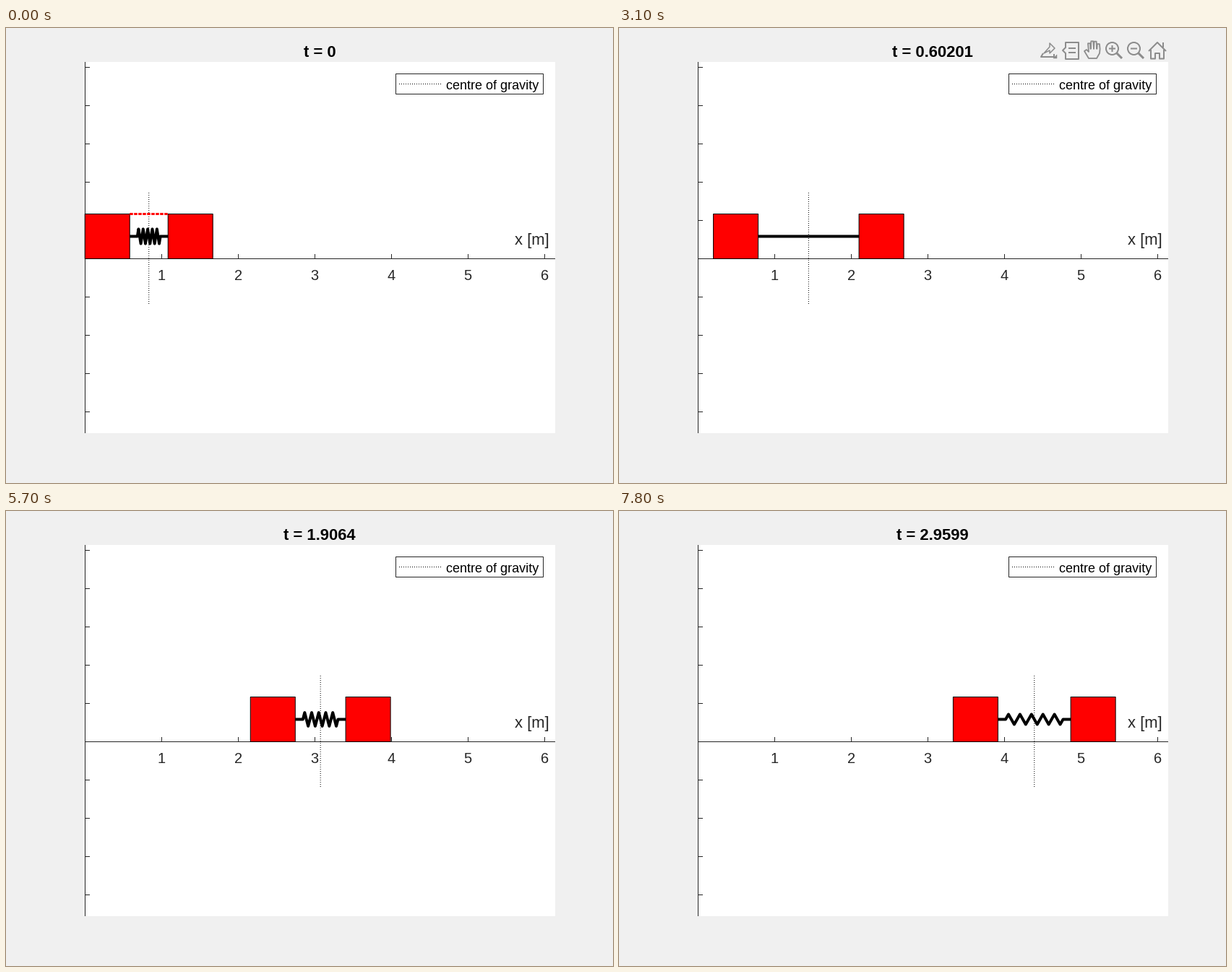
A matplotlib script that plays this animation: 840x630 px, repeating every 7.9 s.

```python
import numpy as np
import matplotlib.pyplot as plt
from matplotlib.animation import FuncAnimation
from matplotlib.patches import Circle, Polygon, Rectangle

W, H, DPI = 840, 630, 100
PX = 72 / DPI                      # one pixel in points
X0, Y0, SCALE = 109.2, 319.5, 106  # pixel origin and pixels per metre
AXIS_X = 109.5                     # pixel centre of the vertical axis
INK, ICON = "#262626", "#8c8c8c"

FRAMES, HOLD = 79, 19              # total frames, frames before release
DT = 3 / 299 * 5                   # simulated seconds per frame
TOOLBAR = range(30, 47)            # frames with the toolbar showing

SIZE = 0.585                       # block side
FREE, SQUEEZE = 1.0, 0.5           # spring rest length, initial compression
W1 = 5.0                           # frequency while the left block rests on the wall
W2 = W1 * np.sqrt(2)               # frequency of the free pair
T_FREE = np.pi / 2 / W1
V_COG = SQUEEZE * W1 / 2

plt.rcParams.update({"font.family": "Liberation Sans", "path.snap": False,
                     "lines.solid_capstyle": "butt"})

fig = plt.figure(figsize=(W / DPI, H / DPI), dpi=DPI, facecolor="#f0f0f0")
ax = fig.add_axes([0, 0, 1, 1])
ax.set_xlim(0, W)
ax.set_ylim(H, 0)
ax.axis("off")


def line(xs, ys, color=INK, width=1, **kw):
    return ax.plot(xs, ys, color=color, lw=width * PX, **kw)[0]


def label(x, y, text, size, **kw):
    return ax.text(x, y, text, fontsize=size * PX, va="baseline", **kw)


def box(x, y, w, h, fill, edge="black", z=2):
    patch = Rectangle((x, y), w, h, fc=fill, ec=edge, lw=PX, zorder=z)
    return ax.add_patch(patch)


def state(t):
    """Left edges of both blocks in metres."""
    if t < T_FREE:
        return 0.0, SIZE + FREE - SQUEEZE * np.cos(W1 * t)
    tau = t - T_FREE
    gap = FREE + SQUEEZE / np.sqrt(2) * np.sin(W2 * tau)
    cog = SIZE + FREE / 2 + V_COG * tau
    return cog - gap / 2 - SIZE, cog + gap / 2


def spring(a, b):
    """Zigzag of five coils between a and b, flattening as it stretches."""
    lead, turns = 0.1, 10
    pitch = (b - a - 2 * lead) / turns
    amp = np.sqrt(max(0, lead**2 - pitch**2))
    i = np.arange(turns)
    xs = np.r_[a, a + lead, a + lead + pitch * (i + 0.5), b - lead, b]
    ys = np.r_[0, 0, amp * (-1.0)**i, 0, 0]
    return X0 + SCALE * xs, Y0 - SCALE * (SIZE / 2 + ys)


def draw_axes():
    tick, digit = 6.5, 11.12  # tick length, advance width of a digit
    ax.add_patch(Rectangle((109, 47), 651, 514, fc="white", lw=0, zorder=0))
    line([AXIS_X, AXIS_X], [47, 561], zorder=1)
    line([109, 760], [Y0, Y0], zorder=1)
    for j in range(-4, 6):
        y = Y0 - j * SCALE / 2
        line([AXIS_X, AXIS_X + tick], [y, y], zorder=1)
    for j in range(1, 7):
        x = AXIS_X + j * SCALE
        line([x, x], [Y0, Y0 - tick], zorder=1)
        label(X0 + j * SCALE - digit / 2, 349.3, str(j), 20, color=INK)
    label(703.8, 300.3, "x [m]", 22, color=INK)


def draw_legend():
    box(539.5, 63.5, 204, 28, "white", INK, z=5)
    line([544, 603], [77.5, 77.5], "black", ls=(0, (1, 2)), zorder=6)
    label(609, 85, "centre of gravity", 18, color="black", zorder=6)


def draw_toolbar():
    """Six outline icons, 30 px apart, each drawn around its own centre."""
    parts = []

    def add(i, pts, closed=False, width=2, fill="none"):
        pts = np.array(pts) + (595 + 30 * i, 31)
        parts.append(ax.add_patch(Polygon(pts, closed=closed, fc=fill, ec=ICON,
                                          lw=width * PX, joinstyle="round")))

    # share: tray, bent arrow and menu corner
    add(0, [(-8, 4), (-11, 9), (7, 9), (7, 5)])
    add(0, [(-7, 4), (1, -5), (1, -10), (8, -3), (1, 4), (1, 0)], True, 1.5)
    add(0, [(11, 6), (11, 11), (6, 11)], True, 0.5, ICON)

    # data tip: notched card with two rows
    add(1, [(-7, -11), (11, -11), (11, 12), (-7, 12), (-7, 4), (-11, 0), (-7, -4)], True)
    for y in (-3, 3):
        add(1, [(-3, y), (7, y)])

    # pan: palm with four fingers, the middle ones longest
    hand = [(-5, 11), (-11, 1), (-8, -1), (-5, 2)]
    for f in range(4):
        x, top = -6 + 4.3 * f, -8 - 5 * np.sin(np.pi * (f + 0.4) / 3.6)
        hand += [(x, top), (x + 3, top), (x + 3.7, -2)]
    add(2, hand + [(10, 4), (6, 11)], True, 1.8)

    # zoom in and zoom out
    for i, spokes in ((3, 2), (4, 1)):
        cx, cy = -2.5, -2.5
        ring = Circle((595 + 30 * i + cx, 31 + cy), 8.5, fill=False, ec=ICON, lw=2 * PX)
        parts.append(ax.add_patch(ring))
        add(i, [(cx + 6, cy + 6), (cx + 13.5, cy + 13.5)], width=3)
        for dx, dy in ((4.5, 0), (0, 4.5))[:spokes]:
            add(i, [(cx - dx, cy - dy), (cx + dx, cy + dy)])

    # home: roof, chimney, walls and door
    add(5, [(-12, 1), (0, -11), (12, 1)])
    add(5, [(8, -4), (8, -11)])
    half = [(3, 4), (3, 11.5), (9, 11.5), (9, -1)]
    add(5, [(-x, y) for x, y in half[::-1]] + half)
    return parts


draw_axes()
draw_legend()
toolbar = draw_toolbar()

side = SIZE * SCALE
top = Y0 - side
blocks = [box(X0, top, side, side, "red") for _ in range(2)]
cog_line = line([0, 0], [228, 382], "black", ls=(0, (1, 2)), zorder=3)
coil = line([], [], "black", 4, zorder=4, solid_joinstyle="round")
rope = line([X0 + side, X0 + side + SQUEEZE * SCALE], [top, top], "red", 3,
            ls=(0, (1.5, 0.5)), zorder=4)
title = label(434, 40, "", 22, weight="bold", color="black", ha="center")


def update(n):
    step = max(0, n - HOLD)
    t = step * DT
    left, right = state(t)
    for block, x in zip(blocks, (left, right)):
        block.set_x(X0 + SCALE * x)
    coil.set_data(*spring(left + SIZE, right))
    x = X0 + SCALE * (left + right + SIZE) / 2
    cog_line.set_xdata([x, x])
    rope.set_visible(step == 0)
    title.set_text(f"t = {t:.5g}")
    for part in toolbar:
        part.set_visible(n in TOOLBAR)
    return [*blocks, coil, cog_line, rope, title, *toolbar]


anim = FuncAnimation(fig, update, frames=FRAMES, interval=100, repeat=True,
                     repeat_delay=0, blit=False)
plt.show()
```
